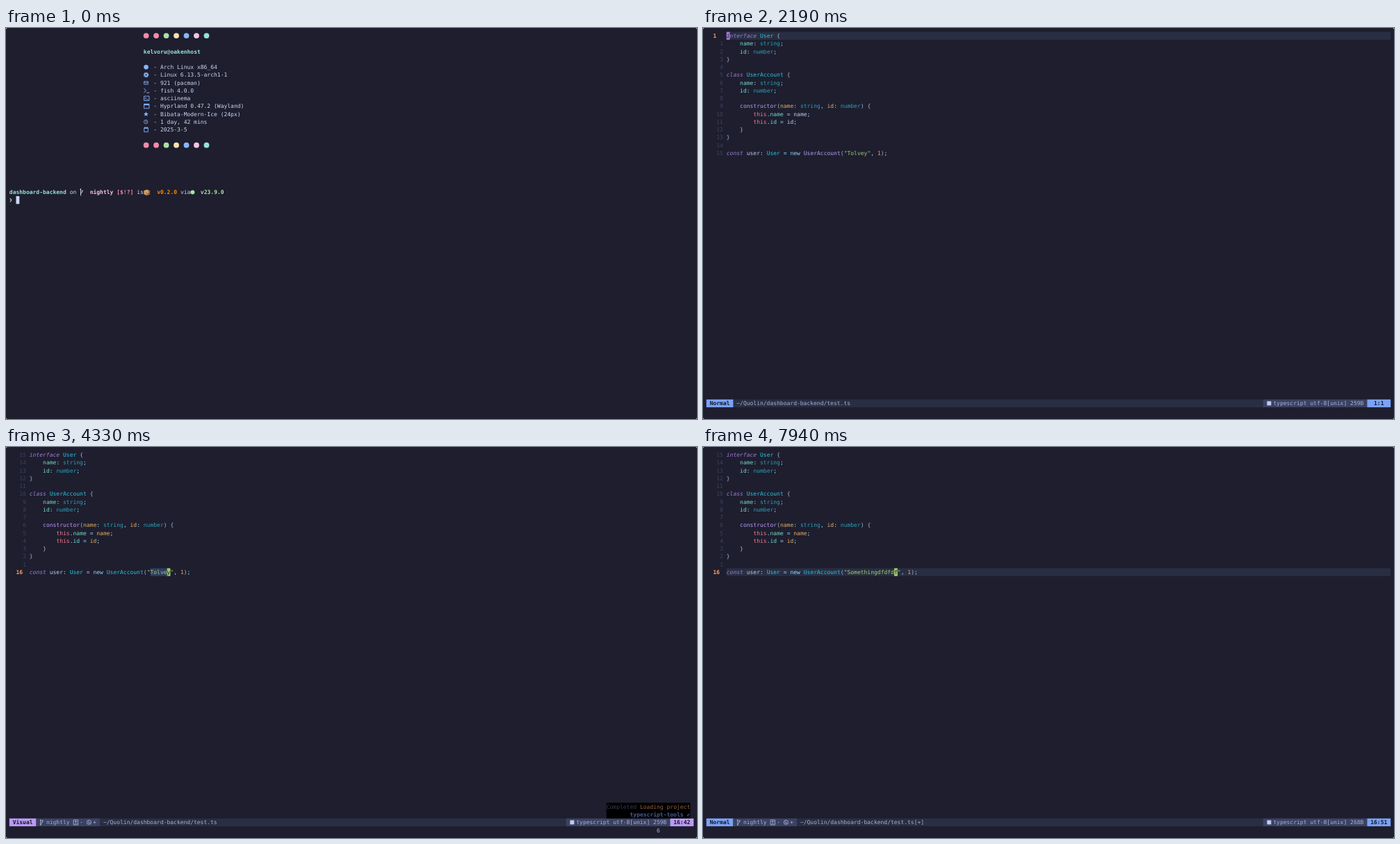
Recreate the animation shown at these times as an HTML page. Size 994 px wide and 563 px high, loop 8 s.

```html
<!DOCTYPE html>
<html lang="en">
<head>
<meta charset="utf-8">
<title>Terminal session</title>
<style>
  html, body { margin: 0; width: 100%; height: 100%; overflow: hidden; background: #fff; }
  svg { display: block; }
  text { font: 8.014px "DejaVu Sans Mono", "DejaVu Sans", monospace; white-space: pre; text-rendering: geometricPrecision; }
</style>
</head>
<body>
<svg id="stage" width="994" height="563" viewBox="0 0 994 563">
  <rect width="994" height="563" rx="2" fill="#1e1e2e"/>
  <g id="screen"></g>
</svg>
<script>
const LOOP = 8000, CW = 994 / 206, LH = 563 / 50;
const BG = '#1e1e2e', LINE = '#292e42', SEGMENT = '#3b4261';
const BOLD = 'font-weight:bold', ITALIC = 'font-style:italic';

// One-letter ink names used as the first character of each text part.
const inks = {
  w: ['#cdd6f4'], T: ['#94e2d5', BOLD], P: ['#f5c2e7', BOLD], R: ['#f38ba8', BOLD],
  O: ['#ff8700', BOLD], G: ['#a6e3a1', BOLD], e: ['#f38ba8'], b: ['#89b4fa'],
  a: ['#a6e3a1'], h: ['#585b70'],
  k: ['#9d7cd8', ITALIC], t: ['#2ac3de'], B: ['#27a1b9'], p: ['#a9b1d6'],
  f: ['#73daca'], o: ['#89ddff'], c: ['#bb9af7'], y: ['#e0af68'], r: ['#f7768e'],
  v: ['#c0caf5'], s: ['#9ece6a'], n: ['#ff9e64'], N: ['#ff9e64', BOLD],
  l: ['#3b4261'], D: ['#15161e', BOLD],
  1: ['#363a50'], 2: ['#96603f'], 3: ['#455d92', BOLD]
};
const modes = { Normal: '#7aa2f7', Visual: '#bb9af7', Insert: '#9ece6a' };

let out, cells;
const X = col => CW * (col + 1);
const Y = row => LH * (row + .5);
const esc = s => s.replace(/&/g, '&amp;').replace(/</g, '&lt;');

function glyphs(row, col, str, fill, style = '') {
  out += `<text x="${X(col).toFixed(2)}" y="${(Y(row) + 8.4).toFixed(2)}" fill="${fill}" style="${style}">${esc(str)}</text>`;
}
function block(row, col, cols, fill, rows = 1) {
  out += `<rect x="${X(col)}" y="${Y(row)}" width="${CW * cols}" height="${LH * rows}" fill="${fill}"/>`;
}
function write(row, col, markup) {
  for (const part of markup.split('|')) {
    const [fill, style] = inks[part[0]], str = part.slice(1);
    const pad = str.length - str.trimStart().length;
    if (str.trim()) glyphs(row, col + pad, str.trim(), fill, style);
    for (const ch of str) cells[row + ',' + col++] = [ch, fill, style];
  }
}
function cursor(row, col) {
  const [ch, fill, style] = cells[row + ',' + col] || [' ', '#cdd6f4'];
  block(row, col, 1, fill);
  if (ch.trim()) glyphs(row, col, ch, BG, style);
}
function icon(row, col, color, shapes) {
  out += `<g transform="translate(${X(col)} ${Y(row)})" fill="none" stroke="${color}" color="${color}">${shapes}</g>`;
}
const latest = (t, steps) => steps.filter(s => s[0] <= t).pop();

const solid = 'fill="currentColor" stroke="none"';
const star = Array.from({ length: 10 }, (_, i) => {
  const r = i % 2 ? 1.6 : 3.7, a = i * Math.PI / 5;
  return [3.6 + r * Math.sin(a), 5.8 - r * Math.cos(a)].map(n => n.toFixed(2));
}).join(' ');
const branch = '<path d="M1.6 2.4V9M1.6 7.2Q4.4 6.6 4.4 4" stroke-width=".9"/><g ' + solid +
  '><circle cx="1.6" cy="2.6" r="1"/><circle cx="1.6" cy="8.9" r="1"/><circle cx="4.4" cy="3.4" r="1"/></g>';

const facts = [
  ['Arch Linux x86_64', `<circle cx="3.7" cy="5.7" r="3.3" ${solid}/>`],
  ['Linux 6.13.5-arch1-1', '<circle cx="3.7" cy="5.6" r="2" stroke-width="1.7"/><circle cx="3.7" cy="5.6" r="3.2" stroke-width="1.2" stroke-dasharray="1.5 1.01"/>'],
  ['921 (pacman)', '<path d="M.7 3.8h5.8v4.2H.7zM.7 5h1.5l.7 1h1.5l.7-1h1.4" stroke-width=".8"/>'],
  ['fish 4.0.0', '<path d="M.5 2.6l3.2 3-3.2 3M4.4 8.7h4"/>'],
  ['asciinema', '<path d="M.7 2.4h7.4v6.4H.7zM2 4.2l1.6 1.4L2 7M4.3 7.2h2.2" stroke-width=".9"/>'],
  ['Hyprland 0.47.2 (Wayland)', '<path d="M.7 2.4h7.4v6.4H.7z" stroke-width=".9"/><path d="M.7 3.5h7.4" stroke-width="1.6"/>'],
  ['Bibata-Modern-Ice (24px)', `<polygon points="${star}" ${solid}/>`],
  ['1 day, 42 mins', '<path d="M6 5.6a2.7 2.7 0 1 0-5.4 0a2.7 2.7 0 1 0 5.4 0M3.3 3.8v1.9l1.3.8" stroke-width=".8"/>'],
  ['2025-3-5', '<path d="M.9 3.2h5.6v5.6H.9z" stroke-width=".9"/><path d="M.9 3.4h5.6M2.2 1.8v2M5.2 1.8v2" stroke-width="1.4"/>']
];

const command = 'nvim test.ts';
const typed = [[0, 0], [600, 1], [690, 2], [780, 3], [880, 4], [970, 5], [1120, 7], [1230, 8], [1330, 9], [1440, 10], [1760, 12]];

function shell(t) {
  const dots = ['#f38ba8', '#f38ba8', '#a6e3a1', '#f9e2af', '#89b4fa', '#f5c2e7', '#94e2d5'];
  for (const row of [0, 14]) dots.forEach((color, i) => {
    out += `<circle cx="${201.6 + i * 3 * CW}" cy="${Y(row) + 5.4}" r="3.9" fill="${color}"/>`;
  });
  write(2, 40, 'Tkelvoru|w@|Toakenhost');
  facts.forEach(([label, shapes], i) => {
    icon(4 + i, 40, '#89b4fa', shapes);
    write(4 + i, 43, 'w- ' + label);
  });

  write(20, 0, 'Tdashboard-backend|w on   |P nightly |R[$!?]|w is    |Ov0.2.0|w via   |Gv23.9.0');
  icon(20, 21, '#f5e9f5', '<path d="M1.4.6v10M1.4 7.2Q4 6.2 4 3.4M.4 2l1-1.4M2.8 4L4 2.6" stroke-width=".9"/>');
  icon(20, 40, 'none', '<path fill="#c9955c" d="M.3 3.6L4.8 1.6 9.2 3.6v4.8L4.8 10.4.3 8.4z"/><path fill="#976339" d="M4.8 5.4l4.4-1.8v4.8L4.8 10.4z"/><path fill="#e4c08a" d="M2 2.8l4.8 2v2l-1.4.5V5.2L1 3.3z"/>');
  icon(20, 54, '#a6e3a1', `<circle cx="3" cy="5.7" r="3" ${solid}/>`);
  icon(21, 0, '#a6e3a1', '<path d="M1 3.2l2 2.5-2 2.5" stroke-width="1.2"/>');

  const count = latest(t, typed)[1];
  if (count) {
    const name = command.slice(0, Math.min(count, 4)), arg = command.slice(5, count);
    write(21, 2, (count < 4 ? 'e' : 'b') + name);
    if (arg) {
      write(21, 7, 'a' + arg);
      out += `<rect x="${X(7)}" y="${Y(21) + 9.6}" width="${CW * arg.length}" height=".7" fill="#a6e3a1"/>`;
    }
    write(21, 2 + count, 'h' + command.slice(count));
  }
  if (t < 1850) cursor(21, 2 + count);
}

const added = 'Somethingdfdfdf';
const insertTimes = [5820, 5930, 6120, 6205, 6290, 6375, 6460, 6630, 6720, 7330, 7408, 7486, 7564, 7642, 7720];
const wordStarts = [1, 7, 11, 13, 18, 20, 24, 35, 37];

function source(t) {
  const count = insertTimes.filter(at => at <= t).length;
  const value = t < 4720 ? 'Tolvey' : added.slice(0, count);
  const analysed = t >= 4265, arg = analysed ? 'y' : 'v', made = analysed ? 't' : 'c';
  const fields = ['    |fname|o: |Bstring|o;', '    |fid|o: |Bnumber|o;'].map(s => 'p' + s);
  const lines = [
    'kinterface |tUser |p{', ...fields, 'p}', '',
    'kclass |tUserAccount |p{', ...fields, '',
    'p    |cconstructor|p(|yname|o: |Bstring|o, |yid|o: |Bnumber|p) {',
    `p        |rthis|o.|fname |o= |${arg}name|o;`,
    `p        |rthis|o.|fid |o= |${arg}id|o;`,
    'p    }', 'p}', '',
    `kconst |vuser|o: |tUser |o= new |${made}UserAccount|p(|s"${value}"|o, |n1|p)|o;`
  ];
  return { lines, count };
}

function statusline(mode, path, size, line, col, git) {
  const row = 47, color = modes[mode];
  block(row, 0, 204, LINE);
  block(row, 0, 8, color);
  write(row, 1, 'D' + mode);
  if (git) {
    block(row, 8, 19, SEGMENT);
    icon(row, 9, '#a9b1d6', branch);
    write(row, 11, 'pnightly   -   +');
    icon(row, 19, '#a9b1d6', '<path d="M.6 2.2h6.4v7H.6zM3.8 3v3M2.3 4.5h3M2.3 7.5h3" stroke-width=".9"/>');
    icon(row, 23, '#a9b1d6', '<circle cx="3.6" cy="5.6" r="3.1" stroke-width=".9"/><path d="M3 3.8v2.9h2.2" stroke-width=".9"/>');
  }
  write(row, git ? 28 : 9, 'p' + path);
  block(row, 166, 31, SEGMENT);
  icon(row, 167, '#c0caf5', `<rect x=".7" y="2.6" width="6" height="6" ${solid}/>`);
  write(row, 169, `ptypescript utf-8[unix] ${size}B`);
  block(row, 197, 7, color);
  write(row, 198, `D${String(line).padStart(2)}:${col}`);
}

function progress(t) {
  if (t < 3800 || t >= 7330) return;
  const done = t >= 4265, label = done ? 'Completed ' : 'In progress... ';
  const start = 203 - label.length - 15;
  block(45, start, 203 - start, '#000', 2);
  write(45, start, `1${label}|2Loading project`);
  write(46, 185, '3typescript-tools ' + (done ? '✔' : '⣿'));
}

function editor(t) {
  const { lines, count } = source(t);
  const mode = t < 4200 ? 'Normal' : t < 4720 ? 'Visual' : t < 5060 ? 'Normal' : t < 7940 ? 'Insert' : 'Normal';
  const line = t < 2750 ? 1 : 16;
  const words = t < 3370 ? 0 : Math.min(8, Math.floor((t - 3370) / (790 / 7) + 1.001));
  const col = t < 4330 ? wordStarts[words] : t < 4720 ? 42 : 37 + count - (t >= 7940 ? 1 : 0);

  if (mode !== 'Visual') block(line - 1, 6, 198, LINE);
  else block(15, 42, col - 37, '#2e3c64');

  lines.forEach((markup, i) => {
    const away = Math.abs(i + 1 - line);
    write(i, away ? 3 : 2, away ? 'l' + String(away).padStart(2) : 'N' + line);
    if (markup) write(i, 6, markup);
  });
  cursor(line - 1, 5 + col);

  const dirty = t >= 4720;
  const path = '~/Quolin/dashboard-backend/test.ts' + (dirty ? '[+]' : '');
  statusline(mode, path, dirty ? 253 + count : 259, line, col, t >= 2290);
  progress(t);
  const pending = latest(t, [[0, ''], [2550, '1'], [2650, '15'], [2750, ''], [4200, '1'], [4265, 'i'], [4330, '6'], [4720, '']])[1];
  if (pending) write(48, 193, 'p' + pending);
}

const screenNode = document.getElementById('screen');
let shown = null;
function draw(t) {
  out = '';
  cells = {};
  if (t < 1930) shell(t);
  else if (t >= 2190) editor(t);
  if (out !== shown) screenNode.innerHTML = shown = out;
}

const begin = performance.now();
function tick() {
  draw((performance.now() - begin) % LOOP);
  requestAnimationFrame(tick);
}
tick();
</script>
</body>
</html>
```
